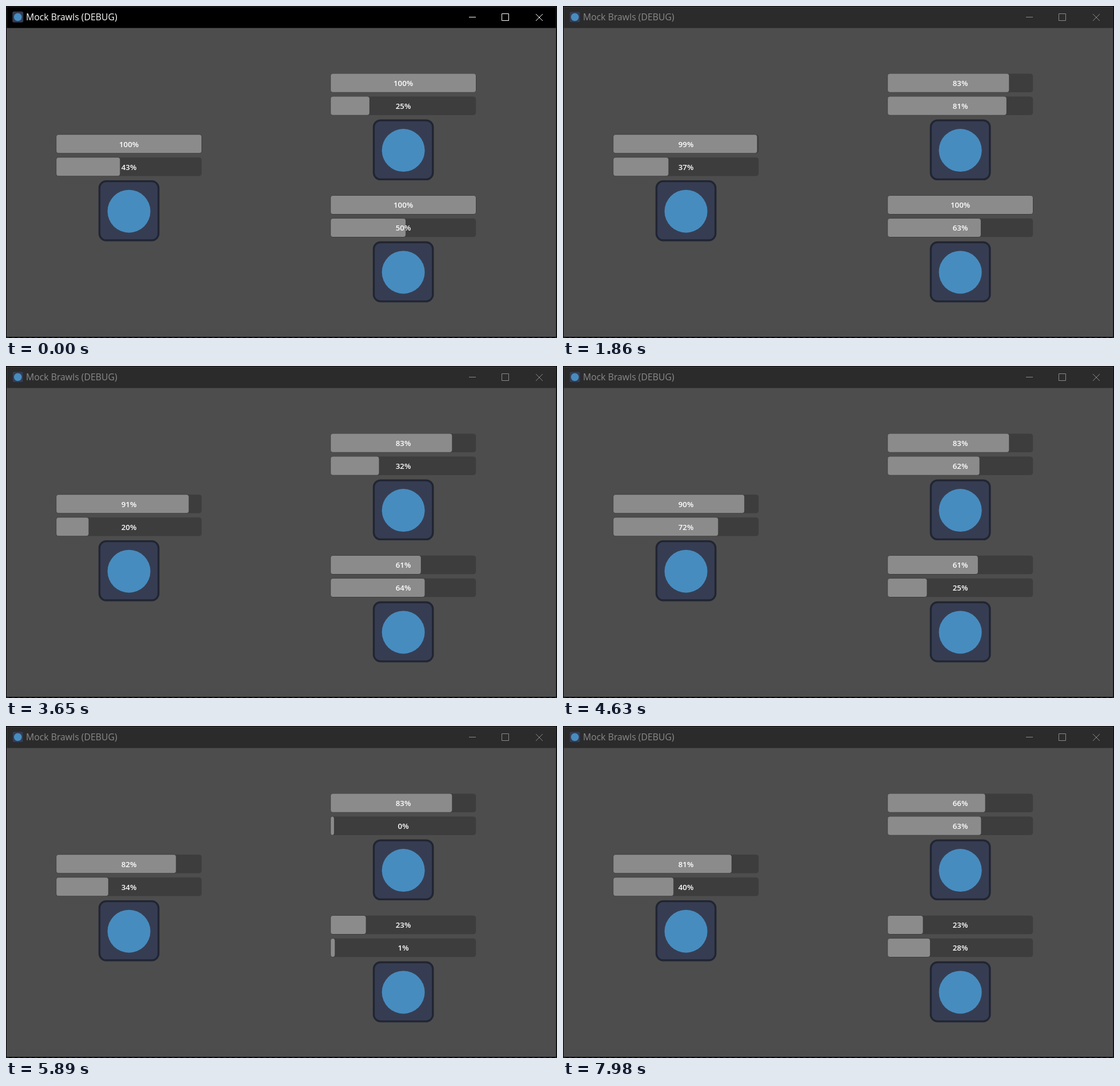
An HTML page for the animation above (8000 ms loop, 964 by 581 pixels).

```html
<!DOCTYPE html>
<html lang="en">
<head>
<meta charset="utf-8">
<title>Mock Brawls (DEBUG)</title>
<style>
  html, body { margin: 0; width: 100%; height: 100%; overflow: hidden; background: #000; }
  svg { display: block; width: 964px; height: 581px; }
  text { font-family: "Open Sans", "Noto Sans", sans-serif; }
  .titlebar { fill: #000; }
  .caption { fill: #fff; font-size: 15.8px; }
  .controls { fill: none; stroke: #fff; stroke-width: 1; }
  .inactive .titlebar { fill: #2b2b2b; }
  .inactive .caption { fill: #8a8a8a; }
  .inactive .controls { stroke: #8a8a8a; }
  .track { fill: #3d3d3d; }
  .fill { fill: #8b8b8b; stroke: #383838; stroke-width: 1.2; paint-order: stroke; }
  .percent { fill: #fff; font-size: 13.33px; font-weight: 600; text-anchor: middle; }
</style>
</head>
<body>
<svg id="stage" viewBox="0 0 964 581">
  <defs>
    <g id="portrait">
      <rect x="2" y="2" width="124" height="124" rx="14" fill="#363d52" stroke="#212532" stroke-width="4"/>
      <circle cx="64" cy="65" r="45" fill="#478cbf"/>
    </g>
  </defs>
  <rect x="1" y="1" width="961.5" height="578" fill="#4d4d4d"/>
  <rect class="titlebar" x="1.5" y="1.5" width="960.5" height="37"/>
  <path d="M0 580.5H964" stroke="#303030" stroke-dasharray="5 5"/>
  <use href="#portrait" transform="translate(11 9.5) scale(.152)"/>
  <text class="caption" x="35" y="25">Mock Brawls (DEBUG)</text>
  <path class="controls" d="M810 19.5h12M867.5 13.5h12v12h-12zM927 14l12 12M939 14l-12 12"/>
  <g id="fighters"></g>
</svg>
<script>
const LOOP = 8000;
const BAR = { width: 254.2, height: 32.5, cap: 6 };

// Runs of evenly spaced screen updates: first ms, last ms, count
const runs = [
  [0, 0, 1], [70, 870, 13], [930, 1720, 13], [1810, 1860, 2], [1950, 2550, 10],
  [2620, 2750, 3], [2820, 3400, 9], [3460, 4220, 12], [4290, 5040, 12],
  [5110, 5890, 13], [5960, 6750, 13], [6810, 7560, 12], [7630, 7980, 6]
];
const updates = runs.flatMap(([first, last, count]) =>
  Array.from({ length: count }, (_, i) =>
    Math.round((first + (last - first) * i / Math.max(1, count - 1)) / 10) * 10));

// Update index to game seconds
const clock = [[0, 0], [28, 1.88], [41, 2.74], [68, 4.58], [87, 5.835], [102, 6.862], [118, 7.9505]];

function gameTime(step) {
  const i = Math.max(1, clock.findIndex(([index]) => index >= step));
  const [a, from] = clock[i - 1], [b, to] = clock[i];
  return from + (to - from) * (step - a) / (b - a);
}

const stage = document.getElementById("stage");

function add(parent, tag, attributes) {
  const node = document.createElementNS(stage.namespaceURI, tag);
  for (const name in attributes) node.setAttribute(name, attributes[name]);
  return parent.appendChild(node);
}

function makeBar(parent, y) {
  const { width, height, cap } = BAR;
  add(parent, "rect", { class: "track", y, width, height, rx: 4.5 });
  const fill = add(parent, "rect", { class: "fill", x: .2, y: y + .2, height: height - .4, rx: 4 });
  const label = add(parent, "text", { class: "percent", x: width / 2, y: y + 21.5 });
  return value => {
    fill.setAttribute("width", cap - .4 + (width - cap) * value / 100);
    label.textContent = Math.round(value) + "%";
  };
}

function makeFighter(x, y, initial, rate) {
  const group = add(document.getElementById("fighters"), "g", { transform: `translate(${x} ${y})` });
  const showHealth = makeBar(group, 0);
  const showCharge = makeBar(group, 40);
  add(group, "use", { href: "#portrait", transform: "translate(73.8 80) scale(.8333)" });
  const charge = time => initial + rate * time;
  return {
    attacks: time => Math.floor(charge(time) / 100),
    show(time, health) {
      showHealth(health);
      showCharge(charge(time) % 100);
    }
  };
}

const hero = makeFighter(88, 225, 42.53, 50);
const brute = makeFighter(568, 118.4, 24.98, 30);
const scout = makeFighter(568, 331.8, 50.49, 60);
const heroTargets = [brute, scout, scout, brute];

function render(ms) {
  let step = updates.length - 1;
  while (updates[step] > ms) step--;
  const time = gameTime(step);
  const hits = heroTargets.slice(0, hero.attacks(time));
  const hitsOn = foe => hits.filter(target => target === foe).length;

  stage.classList.toggle("inactive", step >= 2);
  hero.show(time, 100 - 7 * brute.attacks(time) - scout.attacks(time));
  brute.show(time, 100 - 16.8 * hitsOn(brute));
  scout.show(time, 100 - 38.75 * hitsOn(scout));
}

const start = performance.now();
function tick() {
  render((performance.now() - start) % LOOP);
  requestAnimationFrame(tick);
}
tick();
</script>
</body>
</html>
```
